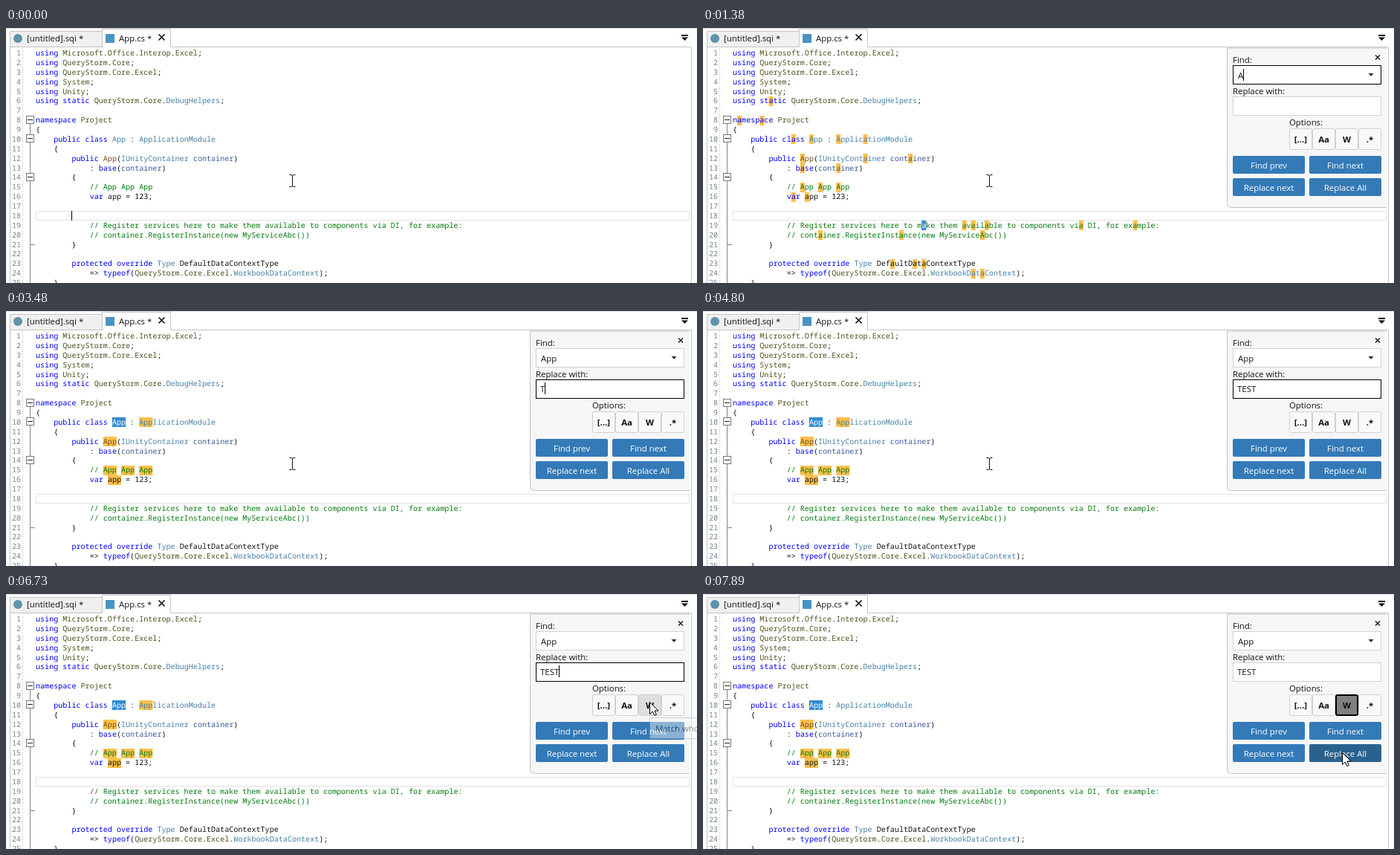
These frames come from a looping animation (930x343 px, 8000 ms). An HTML page:

```html
<!DOCTYPE html>
<html lang="en">
<head>
<meta charset="utf-8">
<title>Find and replace</title>
<style>
html, body { margin: 0; width: 100%; height: 100%; overflow: hidden; background: #fff; }
svg { display: block; width: 930px; height: 343px; }
text { font: 11.4px "Open Sans", "Noto Sans", sans-serif; fill: #111; white-space: pre; }
.code text { font: 10.09px "Noto Sans Mono", "DejaVu Sans Mono", monospace; text-rendering: geometricPrecision; }
.code .kw { fill: #0000f0; }
.code .ns { fill: #50501f; }
.code .type { fill: #4680a8; }
.code .ctor { fill: #74531f; }
.code .param { fill: #3d5a9c; }
.code .note { fill: #087a10; }
.code .num { fill: #6f8794; text-anchor: end; }
.code .picked { fill: #fff; }
.mid { text-anchor: middle; }
.bold { font-weight: 700; }
.btn rect { fill: #337ab7; }
.btn.hover rect { fill: #2a628f; }
.btn text { fill: #fff; }
.opt rect { fill: #f9f9f9; stroke: #d0d0d0; }
.opt.hover rect { fill: #dedede; }
.opt.on rect { fill: #808080; stroke: #000; stroke-width: 2; width: 29px; height: 27px; transform: translate(.5px, .5px); }
.field { fill: #fff; stroke: #d2d2d2; }
.field.focus { stroke: #000; }
</style>
</head>
<body>
<svg id="stage" viewBox="0 0 930 343"></svg>
<script>
const LOOP = 8000, LEFT = 40, CHAR = 6.053, ROW = 12.88;
const stage = document.getElementById('stage');

function el(parent, tag, attrs = {}, text) {
  const node = document.createElementNS('http://www.w3.org/2000/svg', tag);
  for (const k in attrs) node.setAttribute(k, attrs[k]);
  if (text !== undefined) node.textContent = text;
  return parent.appendChild(node);
}
const rect = (p, x, y, width, height, attrs) => el(p, 'rect', { x, y, width, height, ...attrs });
const path = (p, d, attrs) => el(p, 'path', { d, fill: 'none', ...attrs });
const label = (p, x, y, str, cls = '') => el(p, 'text', { x, y, class: cls }, str);
const group = (p, cls = '') => el(p, 'g', { class: cls });

// Window frame and tabs
path(stage, 'M0 .5H930', { stroke: '#dcdcdc' });
path(stage, 'M5.5 343V4.5H129.5V25', { stroke: '#c4c4c4', fill: '#f0f0f0' });
path(stage, 'M5.5 343V25.5H129.5V1.5H221.5V25.5H922.5V343', { stroke: '#c4c4c4', fill: '#fff' });
el(stage, 'circle', { cx: 16, cy: 14, r: 6, fill: '#5e93ad' });
rect(stage, 134, 8, 12, 12, { fill: '#4a94c4' });
label(stage, 28, 18, '[untitled].sqi *');
label(stage, 152, 18, 'App.cs *');
path(stage, 'M205.5 8.5L213.5 16.5M213.5 8.5L205.5 16.5', { stroke: '#111', 'stroke-width': 1.7 });
path(stage, 'M909 9h9v2h-9zM909 12.5h9L913.5 17z', { fill: '#111' });

// Editor
const lines = `using Microsoft.Office.Interop.Excel;
using QueryStorm.Core;
using QueryStorm.Core.Excel;
using System;
using Unity;
using static QueryStorm.Core.DebugHelpers;

namespace Project
{
    public class App : ApplicationModule
    {
        public App(IUnityContainer container)
            : base(container)
        {
            // App App App
            var app = 123;


            // Register services here to make them available to components via DI, for example:
            // container.RegisterInstance(new MyServiceAbc())
        }

        protected override Type DefaultDataContextType
            => typeof(QueryStorm.Core.Excel.WorkbookDataContext);
    }`.split('\n');

const words = {
  kw: 'using static namespace public class base var protected override typeof',
  ns: 'Microsoft Office Interop Excel QueryStorm Core System Unity Project',
  type: 'DebugHelpers ApplicationModule IUnityContainer Type WorkbookDataContext',
  param: 'container'
};
const kinds = {};
for (const k in words) words[k].split(' ').forEach(w => kinds[w] = k);

function kindOf(word, row) {
  if (word.startsWith('//')) return 'note';
  if (word === 'App') return row === 9 ? 'type' : 'ctor';
  return kinds[word] || '';
}
const colX = col => LEFT + col * CHAR;
const topY = row => Math.floor(28 + row * ROW);
const baseY = row => Math.round(37 + row * ROW);
const mark = (p, row, col, len, fill) =>
  rect(p, colX(col), topY(row), len * CHAR, 13, { fill });

const code = group(stage, 'code');
rect(code, 40.5, 246.5, 879, 12, { fill: 'none', stroke: '#e2e2e2' });
path(code, 'M22.5 27V343', { stroke: '#b8b8b8', 'stroke-dasharray': '1 2' });
path(code, 'M32.5 128V343M32.5 291.5H39', { stroke: '#858585' });
for (const row of [7, 9, 13]) {
  const y = topY(row) + .5;
  rect(code, 27.5, y, 10, 10, { fill: '#fff', stroke: '#777' });
  path(code, `M29 ${y + 5}h7`, { stroke: '#222' });
}

const queries = { a: /a/gi, ap: /ap/gi, app: /app/gi, whole: /\bapp\b/gi };
const marks = {};
for (const q in queries) {
  marks[q] = group(code);
  lines.forEach((line, row) => {
    for (const m of line.matchAll(queries[q])) mark(marks[q], row, m.index, m[0].length, '#ffc04c');
  });
}
lines.forEach((line, row) => {
  const y = baseY(row);
  label(code, 20, y, row + 1, 'num');
  for (const m of line.matchAll(/\/\/.*|\w+|[^\w\s]+/g))
    label(code, colX(m.index), y, m[0], kindOf(m[0], row));
});

// Selected match: [row, column, length]
const picks = { make: [18, 42, 1], ap: [9, 17, 2], app: [9, 17, 3] };
const picked = {};
for (const k in picks) {
  const [row, col, len] = picks[k];
  picked[k] = group(code);
  mark(picked[k], row, col, len, '#338cd2');
  label(picked[k], colX(col), baseY(row), lines[row].substr(col, len), 'picked');
}

// Search panel
const panel = group(stage);
path(panel, 'M920 27H705.5V235.5Q705.5 241.5 711.5 241.5H920', { fill: '#f6f6f7', stroke: '#c2c2c6' });
path(panel, 'M905 36.5l6 6M911 36.5l-6 6', { stroke: '#111', 'stroke-width': 1.3 });
label(panel, 713, 46.5, 'Find:');
label(panel, 713, 89, 'Replace with:');
label(panel, 789, 131, 'Options:');
const fields = {
  find: rect(panel, 713.5, 50.5, 199, 25, { class: 'field' }),
  swap: rect(panel, 713.5, 92.5, 199, 25, { class: 'field' })
};
path(panel, 'M895.5 61h7L899 65z', { fill: '#3c2a2a' });
const findText = label(panel, 720, 67.5, '');
const swapText = label(panel, 719, 108.5, '');

const parts = {};
['[...]', 'Aa', 'W', '.*'].forEach((str, i) => {
  const g = parts[str] = group(panel, 'opt'), x = 789.5 + i * 31;
  rect(g, x, 135.5, 30, 28, { rx: 2 });
  label(g, x + 15, 154, str, 'mid bold');
});
const buttons = group(panel);
['Find prev', 'Find next', 'Replace next', 'Replace All'].forEach((str, i) => {
  const g = parts[str] = group(buttons, 'btn');
  const x = 713 + i % 2 * 103, y = i < 2 ? 172 : 202;
  rect(g, x, y, 97, 24, { rx: 2 });
  label(g, x + 48.5, y + 17, str, 'mid');
});

const caret = rect(stage, 0, 0, 1, 16, { fill: '#000' });
const tip = group(stage);
rect(tip, 866.5, 166.5, 100, 28, { fill: '#f3f7fb', stroke: '#8aa0b0' });
label(tip, 874, 184.5, 'Match whole word');

const beam = path(stage, 'M-3.5 -7.5H-1L.5 -6.5L2 -7.5H4.5M.5 -7V8M-3.5 8.5H-1L.5 7.5L2 8.5H4.5', { stroke: '#111' });
const arrow = path(stage, 'M-.5 -.5V15.5L3.3 12L5.8 17.5L8.3 16.4L5.9 11H11Z', { fill: '#fff', stroke: '#000' });

const at = (x, y, h = 16) => ({ x, y, h });
const end = at(744, 96);
const steps = [
  [0, { panel: false, find: '', swap: '', focus: 'find', query: '', pick: '', caret: at(88, 246, 13), tip: 0, on: false }],
  [460, { panel: true, caret: at(720, 55) }],
  [920, { caret: null }],
  [1380, { find: 'A', query: 'a', pick: 'make', caret: at(727, 55) }],
  [1620, { find: 'Ap', query: 'ap', pick: 'ap', caret: at(734, 55) }],
  [1780, { find: 'App', query: 'app', pick: '', caret: at(741, 55) }],
  [1930, { pick: 'app' }],
  [2310, { focus: 'swap', caret: null }],
  [2390, { caret: at(719, 96) }],
  [2940, { caret: null }],
  [3400, { caret: at(719, 96) }],
  [3480, { swap: 'T', caret: at(725, 96) }],
  [4010, { swap: 'TE', caret: at(731, 96) }],
  [4180, { swap: 'TES', caret: at(737, 96) }],
  [4250, { swap: 'TEST', caret: end }],
  [4800, { caret: null }],
  [5260, { caret: end }],
  [5800, { caret: null }],
  [5880, { hover: 'Replace next' }],
  [6120, { hover: 'Find prev' }],
  [6200, { hover: '' }],
  [6280, { caret: end }],
  [6350, { hover: 'W' }],
  [6580, { tip: .15 }],
  [6650, { tip: .3 }],
  [6730, { tip: .45 }],
  [6800, { tip: .7 }],
  [6880, { tip: .9 }],
  [6960, { on: true, focus: '', query: 'whole', caret: null, tip: .6 }],
  [7040, { tip: .3 }],
  [7120, { tip: 0 }],
  [7650, { hover: '' }],
  [7730, { hover: 'Find next' }],
  [7810, { hover: 'Replace All' }]
];
const moves = [
  [0, 385, 205], [5340, 392, 207], [5410, 415, 210], [5490, 455, 214], [5570, 510, 217],
  [5650, 570, 220], [5730, 630, 221], [5800, 690, 220], [5880, 738, 219], [5960, 770, 214],
  [6040, 786, 199], [6120, 792, 190], [6200, 815, 178], [6280, 845, 162], [6350, 870, 152],
  [6430, 867, 146], [7650, 866, 160], [7730, 864, 180], [7810, 862, 203], [7890, 861, 214]
];

const show = (node, yes) => node.setAttribute('visibility', yes ? 'visible' : 'hidden');

function draw(t) {
  const s = Object.assign({}, ...steps.filter(([at]) => at <= t).map(([, change]) => change));
  const [, x, y] = moves.filter(([at]) => at <= t).pop();

  panel.setAttribute('display', s.panel ? 'inline' : 'none');
  buttons.setAttribute('opacity', s.find ? 1 : .65);
  findText.textContent = s.find;
  swapText.textContent = s.swap;
  for (const k in fields) fields[k].classList.toggle('focus', s.focus === k);
  for (const k in marks) show(marks[k], s.query === k);
  for (const k in picked) show(picked[k], s.pick === k);
  for (const k in parts) parts[k].classList.toggle('hover', s.hover === k);
  parts.W.classList.toggle('on', s.on);
  tip.setAttribute('opacity', s.tip);

  show(caret, s.caret);
  if (s.caret) {
    caret.setAttribute('x', s.caret.x);
    caret.setAttribute('y', s.caret.y);
    caret.setAttribute('height', s.caret.h);
  }
  const inEditor = x < 706;
  show(beam, inEditor);
  show(arrow, !inEditor);
  (inEditor ? beam : arrow).setAttribute('transform', `translate(${x} ${y})`);
}

const start = performance.now();
function tick() {
  draw((performance.now() - start) % LOOP);
  requestAnimationFrame(tick);
}
tick();
</script>
</body>
</html>
```
